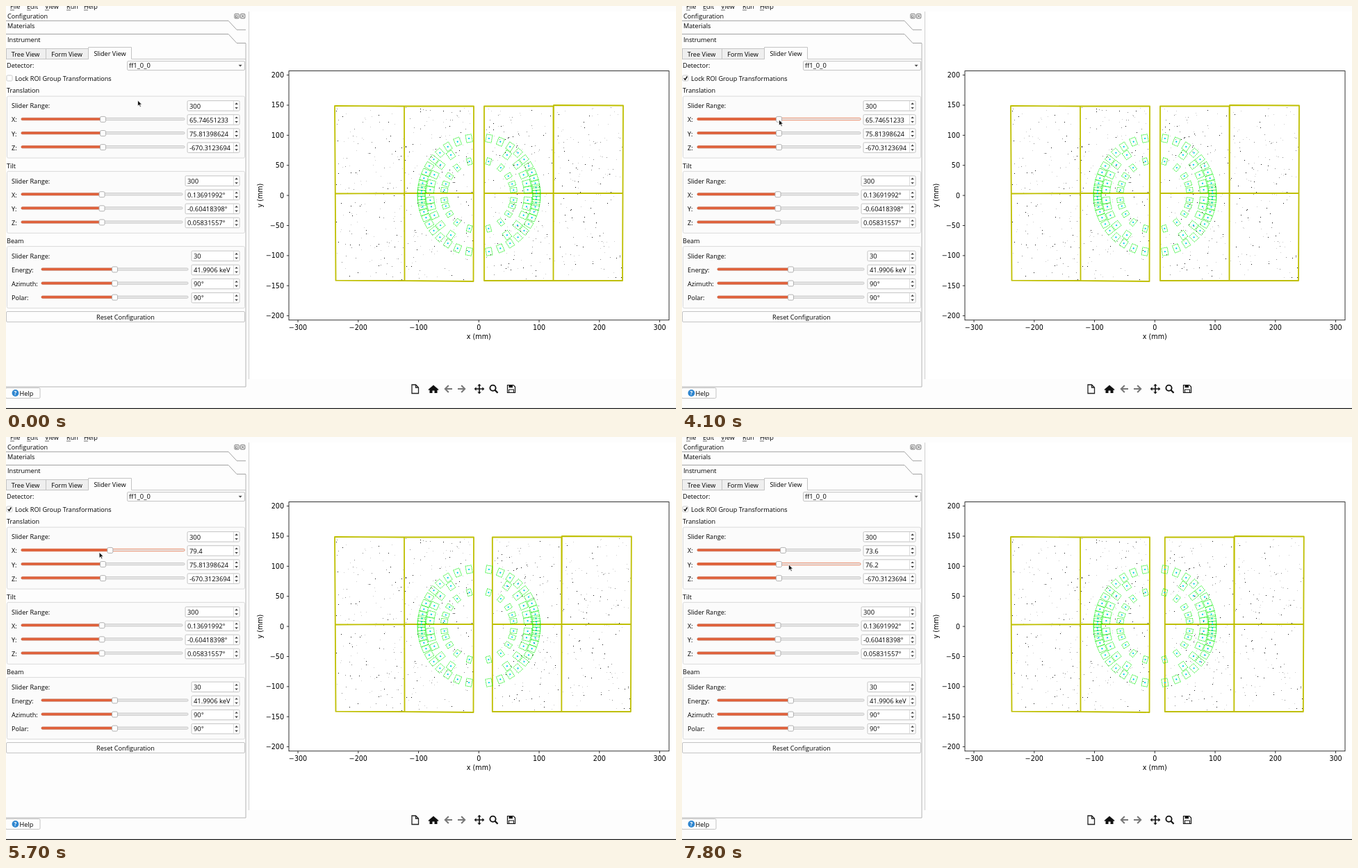
An HTML page for the animation above (8000 ms loop, 964x581 px).

```html
<!DOCTYPE html>
<html lang="en">
<head>
<meta charset="utf-8">
<title>Instrument configuration</title>
<style>
html, body { margin: 0; width: 100%; height: 100%; overflow: hidden; background: #fff; }
svg { display: block; width: 964px; height: 581px; }
text { font: 500 9.15px "Open Sans", "Noto Sans", sans-serif; fill: #000; white-space: pre; }
.value { font-size: 9.35px; }
.plot text { font: 9.6px "DejaVu Sans", sans-serif; }
.accent { stroke: #e9764f; }
</style>
</head>
<body>
<svg id="stage" viewBox="0 0 964 581"></svg>
<script>
const ORANGE = '#e2633c', EDGE = '#c4c4c4', WINDOW = '#fdfdfd';

const rect = (x, y, w, h, fill, stroke = 'none', extra = '') =>
  `<rect x="${x}" y="${y}" width="${w}" height="${h}" fill="${fill}" stroke="${stroke}" ${extra}/>`;
const path = (d, stroke, width = 1, fill = 'none', extra = '') =>
  `<path d="${d}" stroke="${stroke}" stroke-width="${width}" fill="${fill}" ${extra}/>`;
// y is the middle of the capitals
const text = (x, y, s, anchor = 'start', extra = '') =>
  `<text x="${x}" y="${y + 3.4}" text-anchor="${anchor}" ${extra}>${s}</text>`;
const button = (x, y, w, h) => rect(x, y, w, h, WINDOW, EDGE, 'rx="1.5"');

let seed = 11;
const random = () => (seed = (seed * 16807) % 2147483647) / 2147483647;

function menuBar() {
  return [['File', 6], ['Edit', 30], ['View', 56], ['Run', 87], ['Help', 112]]
    .map(([s, x]) => text(x, 1, s) + path(`M${x} 5.9h6`, '#333', .7)).join('');
}

function dock() {
  const fold = y => path(`M0 ${y}H320L332 ${y + 13}H345`, '#8c8c8c', .8);
  const icon = x => rect(x, 11.4, 6.4, 6.4, '#fff', '#555', 'rx="1" stroke-width=".8"');
  return rect(0, 0, 349.5, 581, WINDOW) + rect(0, 0, 964, 8, WINDOW) + rect(349, 538, 615, 43, WINDOW) +
    path('M349.5 8V538', '#d0d0d0') + path('M345 54V549H0', '#b4b4b4') +
    menuBar() + text(2, 14.2, 'Configuration') +
    icon(328.9) + rect(330.5, 13.8, 2.6, 2.4, 'none', '#555', 'stroke-width=".7"') +
    icon(337.4) + path('M338.8 12.8l3.6 3.6m0-3.6l-3.6 3.6', '#444', .9) +
    fold(21.3) + text(2, 28.6, 'Materials') + fold(40.5) + text(2, 48.2, 'Instrument') +
    rect(.5, 61.5, 57, 15, '#efefef', EDGE) + rect(57.5, 61.5, 61, 15, '#efefef', EDGE) +
    path('M118.5 76.5V59.5H180.5V76.5H345', EDGE, 1, WINDOW) +
    text(28, 69.2, 'Tree View', 'middle') + text(87.5, 69.2, 'Form View', 'middle') +
    text(149.5, 69, 'Slider View', 'middle') +
    text(1, 86, 'Detector:') + button(174.5, 79.5, 169, 13) +
    text(177, 85.8, 'ff1_0_0', 'start', 'class="value"') + path('M334.6 84.8h5l-2.5 2.8z', 'none', 0, '#444') +
    rect(1, 100, 8, 8, '#fff', EDGE, 'id="box" rx="1.5" stroke-width=".9"') +
    path('M2.8 104.1l1.7 2.1 3-4.7', '#111', 1.4, 'none', 'id="tick"') +
    text(13, 104.4, 'Lock ROI Group Transformations');
}

function slider(y, x0, x1, id) {
  const knob = (x0 + x1) / 2;
  return rect(x0, y - 2.6, x1 - x0, 3.2, '#e9e9e9', '#bdbdbd', `id="track${id}" rx="1.5" stroke-width=".8"`) +
    rect(x0, y - 2.6, knob - x0, 3.2, ORANGE, '#cf5a36', `id="fill${id}" rx="1.5" stroke-width=".6"`) +
    rect(knob - 4, y - 4.6, 8, 8, WINDOW, '#ababab', `id="knob${id}" rx="1.8" stroke-width=".9"`);
}

function spinBox(y, x, value, id) {
  return rect(x, y - 7.3, 336 - x, 14.5, '#fff', EDGE, 'rx="1.5"') +
    path(`M327.5 ${y - 7}v14`, '#d4d4d4', .8) +
    path(`M329.3 ${y - 2}h4.6l-2.3 -2.6zM329.3 ${y + 2}h4.6l-2.3 2.6z`, 'none', 0, '#444') +
    text(x + 3, y + .3, value, 'start', `class="value" id="value${id}"`);
}

function group(title, top, boxX, x0, x1, range, rows) {
  const first = top + 22.3;
  return text(1, top + .2, title) +
    rect(1.5, top + 8.5, 342, 89, '#fbfbfb', '#dadada', 'rx="2"') +
    text(8, first, 'Slider Range:') + spinBox(first, boxX, range, title + 'Range') +
    rows.map(([label, value], i) => {
      const y = first + 20.1 * (i + 1), id = title + i;
      return text(8, y, label) + slider(y, x0, x1, id) + spinBox(y, boxX, value, id);
    }).join('');
}

function controls() {
  return group('Translation', 121.6, 261, 22, 257, 300,
      [['X:', '65.74651233'], ['Y:', '75.81398624'], ['Z:', '-670.3123694']]) +
    group('Tilt', 229.9, 258, 22, 254, 300,
      [['X:', '0.13691992°'], ['Y:', '-0.60418398°'], ['Z:', '0.05831557°']]) +
    group('Beam', 338.1, 267, 51, 262, 30,
      [['Energy:', '41.9906 keV'], ['Azimuth:', '90°'], ['Polar:', '90°']]) +
    button(.5, 440.5, 343, 15) + text(172, 448.5, 'Reset Configuration', 'middle') +
    button(-.5, 550.5, 49.5, 15) + '<circle cx="13.5" cy="558" r="4.9" fill="#2f86cf"/>' +
    text(13.5, 557.6, '?', 'middle', 'style="fill:#fff;font-weight:700;font-size:8px"') +
    text(19.5, 558.3, 'Help');
}

const ORIGIN = { x: 680.3, y: 273.1 }, SCALE = .8675; // pixels per mm

function axes() {
  const label = v => String(v).replace('-', '−');
  let s = rect(407, 93.6, 547, 359.2, 'none', '#000', 'stroke-width=".8"');
  for (let v = -300; v <= 300; v += 100) {
    const x = ORIGIN.x + v * SCALE;
    s += path(`M${x} 452.8v3.2`, '#000', .8) + text(x, 463.4, label(v), 'middle');
  }
  for (let v = -200; v <= 200; v += 50) {
    const y = ORIGIN.y - v * SCALE;
    s += path(`M407 ${y}h-3.2`, '#000', .8) + text(400, y, label(v), 'end');
  }
  return s + text(ORIGIN.x, 476.3, 'x (mm)', 'middle') +
    text(0, 0, 'y (mm)', 'middle', `transform="translate(366 ${ORIGIN.y}) rotate(-90)"`);
}

function specks(x0) {
  return [['#111', 95], ['#888', 100], ['#ccc', 190]].map(([color, count]) => {
    let d = '';
    while (count--)
      d += `M${Math.round(x0 + random() * 197)} ${Math.round(146 + random() * 248)}h1v1h-1z`;
    return path(d, 'none', 0, color, 'shape-rendering="crispEdges"');
  }).join('');
}

const panels = d => path(d, '#bfbf00', 1.8, 'none', 'stroke-linejoin="round"');

// Spot boxes crowd towards the horizontal; each is mirrored into all quadrants
function spots() {
  const ring = (r, w, h, first, count) => {
    let s = '';
    for (let i = 0; i < count - 1; i++) {
      const a = 90 - (90 - first) * (1 - i / count) ** 2;
      for (const turn of [a, -a, 180 - a, a - 180])
        s += `<g transform="translate(680.5 272.5) rotate(${turn}) translate(0 ${-r})">` +
          rect(-w / 2, -h / 2, w, h, 'none', '#00f000', 'stroke-width=".8" stroke-dasharray="1.5 .9"') +
          rect(-1, -1, 2, 2, '#00e5f0') + rect(-.4, -.4, .8, .8, '#2b7bd0') + '</g>';
    }
    return s;
  };
  return ring(82.8, 8.5, 11, 10, 13) + ring(70.5, 9, 11, 35, 6) + ring(50.3, 6.5, 9.5, 16, 6);
}

function toolbar() {
  const back = 'M642 552h-10m4.8-5l-5 5 5 5';
  let s = path('M584 546h5.5l4 4v8.5h-9.5zM589.5 546v4h4', '#222', 1.3) +
    path('M607.5 553l7.5-6.5 7.5 6.5-1 1-1-.8v4.8h-4v-3.5h-3v3.5h-4v-4.8l-1 .8z', 'none', 0, '#111') +
    path(back, '#777', 2) + path(back, '#777', 2, 'none', 'transform="translate(1292 0) scale(-1 1)"') +
    '<circle cx="700.5" cy="550.7" r="4.1" fill="none" stroke="#111" stroke-width="1.9"/>' +
    path('M703.5 553.7l4 4', '#111', 2.3) +
    path('M721.5 546.5h8.5l2.5 2.5v8.5h-11z', '#111', 1.2) +
    rect(723.5, 546.8, 5.5, 3.4, '#111') + rect(723.5, 553, 7, 4.2, '#fff', '#111');
  for (let turn = 0; turn < 360; turn += 90)
    s += path('M-.8 0V-4.4H-2.7L0-7.3L2.7-4.4H.8V0z', 'none', 0, '#111',
      `transform="translate(681 552) rotate(${turn})"`);
  return s;
}

function tooltip() {
  const lines = [
    'If checked, when a detector is transformed (translation or tilt), all other detectors in the same group will',
    'be transformed in a similar way. For translation, all detectors will be translated by the same amount, and',
    'in the same direction. For tilt, all detectors in the same group will be rotated about the mean of the',
    'detector centers.'
  ];
  return '<g id="tip">' + rect(92, 113.5, 450, 47, '#000', 'none', 'opacity=".12" rx="2"') +
    rect(90.5, 111.5, 449, 46, '#ffffdc', '#77776a') +
    lines.map((s, i) => text(93, 118.8 + 10.9 * i, s, 'start', 'style="font-size:9.1px"')).join('') + '</g>';
}

document.getElementById('stage').innerHTML = rect(0, 0, 964, 581, '#fff') + dock() + controls() +
  '<g class="plot">' + axes() + specks(475) +
  panels('M473 144L573 144.5L573.5 396L474.5 395.7zM573 144.5H673L672.5 397L573.5 396M473.5 270.5L573 270H673') +
  '<g id="moving">' + specks(689) +
  panels('M688 144.5H787.5V396H688zM788 143L888 143.5L887 396H787.5zM688 270H887.5') + '</g>' +
  spots() + '</g>' + toolbar() + rect(0, 579.8, 964, 1.2, '#111') + tooltip() +
  path('M0 0V8.3L2 6.5L3.4 9.6L4.8 9L3.4 6H6z', '#fff', .7, '#111', 'id="mouse"');

const X0 = 65.75;
// Turning points: time, then pointer x and y, or the X translation
const pointerKeys = [
  [200, 189.5, 136], [700, 90, 104], [3300, 90, 104], [3700, 139.5, 164], [4300, 139.5, 164],
  [5000, 184, 164], [5200, 160.5, 164], [6100, 113, 168], [6400, 137, 169],
  [6700, 147, 168], [7400, 139, 168], [7800, 153.5, 184]
];
const offsetKeys = [
  [4300, X0], [4600, 66.2], [4900, 103.8], [5200, 132.6], [5700, 79.4],
  [6200, 35.3], [6400, 44.5], [6600, 66], [6900, 73.5], [7400, 73.6]
];
// The screen refreshes every 100 ms within these spans and rests between them
const bursts = [
  [0, 0], [300, 700], [3400, 3700], [4400, 4600], [4800, 4900], [5100, 5200], [5400, 5500],
  [5700, 5800], [6000, 6200], [6400, 6600], [6800, 6900], [7200, 7400], [7600, 7800]
];

function refreshed(t) {
  const [, end] = bursts.findLast(([begin]) => begin <= t);
  return Math.min(Math.floor(t / 100) * 100, end);
}

function along(keys, t) {
  const next = keys.findIndex(k => k[0] > t);
  if (next < 1) return keys.at(next).slice(1);
  const a = keys[next - 1], b = keys[next], p = (t - a[0]) / (b[0] - a[0]);
  return a.map((v, i) => v + (b[i] - v) * p).slice(1);
}

const $ = id => document.getElementById(id);
const show = (id, on) => $(id).setAttribute('visibility', on ? 'visible' : 'hidden');
const focus = (id, on) => $(id).classList.toggle('accent', on);

function draw(t) {
  const now = refreshed(t), [mx, my] = along(pointerKeys, now), [x] = along(offsetKeys, now);
  const knob = 139.5 + (x - X0) * .757;
  $('mouse').setAttribute('transform', `translate(${mx} ${my})`);
  $('moving').setAttribute('transform', `translate(${(x - X0) * SCALE} 0)`);
  $('knobTranslation0').setAttribute('x', knob - 4);
  $('fillTranslation0').setAttribute('width', knob - 22);
  $('valueTranslation0').textContent = t < 4400 ? '65.74651233' : x.toFixed(1);
  $('valueTranslation1').textContent = t < 7800 ? '75.81398624' : '76.2';
  show('tip', t >= 1400 && t < 2500);
  show('tick', t >= 2600);
  focus('box', t >= 2600 && t < 4100);
  focus('trackTranslation0', t >= 4100 && t < 7700);
  focus('trackTranslation1', t >= 7700);
}

const start = performance.now();
function frame() {
  draw((performance.now() - start) % 8000);
  requestAnimationFrame(frame);
}
frame();
</script>
</body>
</html>
```
